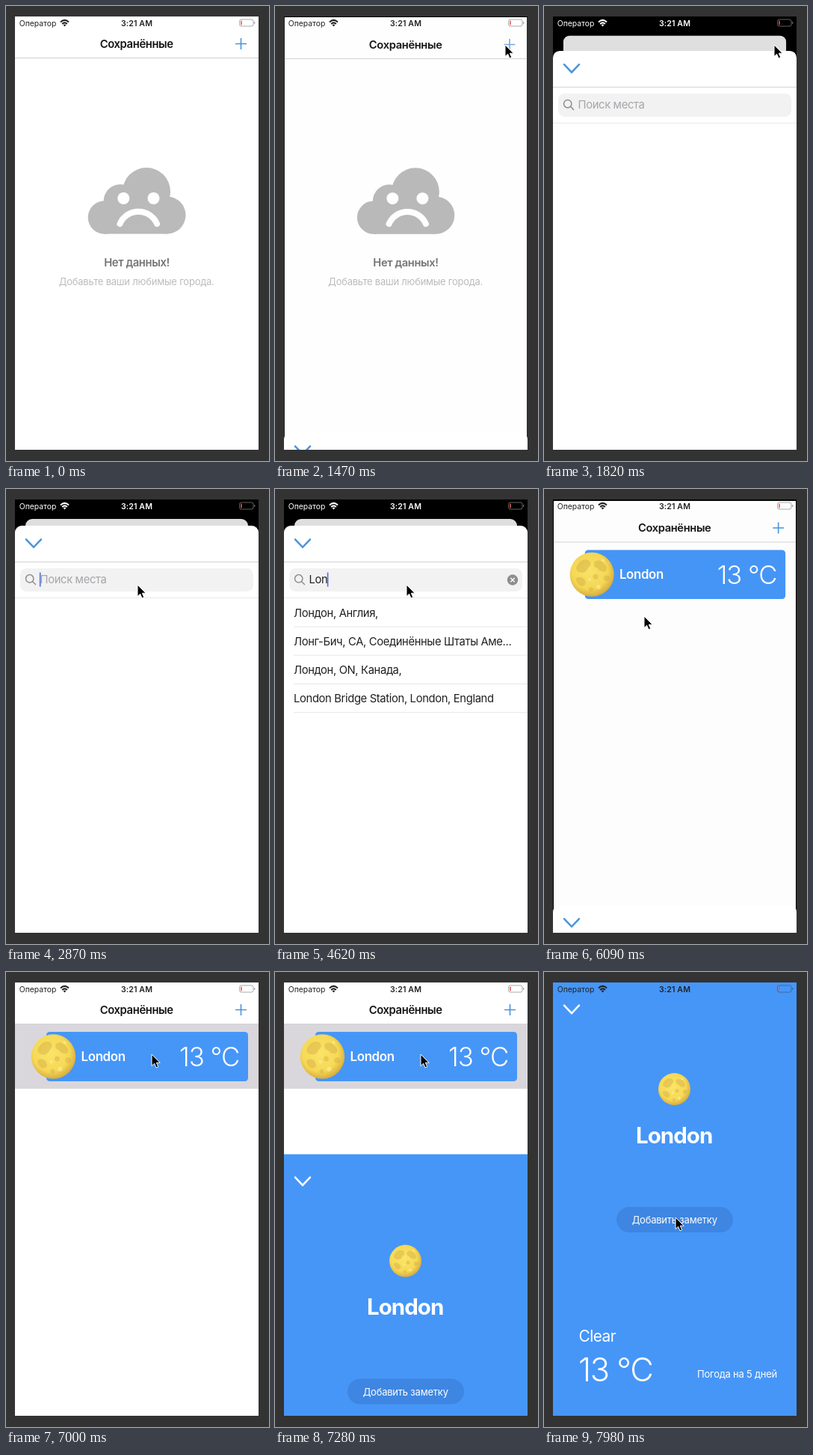
Write an HTML page that moves like this. It is 352 px wide and 608 px high and loops after 8000 ms.

```html
<!DOCTYPE html>
<html lang="ru">
<head>
<meta charset="utf-8">
<title>Погода</title>
<style>
  html, body { margin: 0; width: 100%; height: 100%; overflow: hidden; background: #333; }
  svg { display: block; width: 352px; height: 608px; }
  text { font-family: Inter, "Noto Sans", sans-serif; white-space: pre; }
</style>
</head>
<body>
<svg id="stage" viewBox="0 0 352 608"></svg>
<script>
const LOOP = 8000, STEP = 70;
const BLUE = '#4696f8', TINT = '#4a94dc', INK = '#202022';
const ROW = 38.2;

const text = (x, y, str, size, o = {}) =>
  `<text x="${x}" y="${y}" font-size="${size}" font-weight="${o.weight || 400}" fill="${o.fill || INK}"
    letter-spacing="${o.gap || 0}" text-anchor="${o.anchor || 'start'}">${str}</text>`;
const body = (x, y, str, o) => text(x, y, str, 14.8, { gap: -.36, ...o });
const small = (x, y, str, o) => text(x, y, str, 13, { gap: -.22, ...o });
const line = (x, y, color) => `<path d="M${x} ${y}H338" stroke="${color}"/>`;
const chevron = (y, color) =>
  `<path d="M27 ${y}L37 ${y + 10.5}L47 ${y}" fill="none" stroke="${color}" stroke-width="2.5" stroke-linecap="round"/>`;
const moon = (x, y, r) => `<use href="#moon" transform="translate(${x} ${y}) scale(${r / 30})"/>`;
const row = (str, i) => body(25, 170.5 + ROW * i, str) + line(25, 184 + ROW * i, '#e6e6e8');
const mid = { anchor: 'middle' };

const found = ['Лондон, Англия,', 'Лонг-Бич, CA, Соединённые Штаты Аме...',
  'Лондон, ON, Канада,', 'London Bridge Station, London, England'];
const early = ['Лондон, Англия,', 'Лос-Анджелес, CA, Соединённые Штаты...', 'Лонг-Бич, CA, Соединённые Штаты Аме...',
  'Лос-Кабос, Мексика', 'Лодзь, Польша', 'Лозанна, Швейцария', 'Лондон, ON, Канада,',
  'Лос-Анхелес, Чили', 'Ломе, Того', 'Лома-Линда, CA, Соединённые Штаты...'];

const defs = `<defs>
  <clipPath id="screen"><path d="M12 14H338V593H12Z"/></clipPath>
  <clipPath id="page"><rect id="pageShape" x="12" y="14" width="326" height="579"/></clipPath>
  <radialGradient id="glow" cx=".45" cy=".42" r=".58">
    <stop offset="0" stop-color="#fbe468"/><stop offset=".7" stop-color="#f6d956"/><stop offset="1" stop-color="#d9ae3f"/>
  </radialGradient>
  <g id="moon">
    <circle r="30" fill="url(#glow)"/>
    <g fill="#d2ab45" opacity=".42">
      <path d="M-20-13Q-13-23-4-19Q1-14-5-9Q-8-1-16-3Q-24-5-20-13Z"/>
      <path d="M3-17Q11-22 17-14Q23-9 18-4Q11-3 8-8Q1-10 3-17Z"/>
      <path d="M-22 5Q-15 1-10 7Q-6 14-13 16Q-21 15-22 5Z"/>
      <circle cx="20" cy="5" r="4"/><circle cx="5" cy="3" r="3.5"/><circle cx="-1" cy="20" r="3"/>
    </g>
    <g fill="#fff0a0" opacity=".6"><circle cx="9" cy="17" r="3"/><circle cx="-3" cy="7" r="2"/><circle cx="15" cy="-19" r="2"/></g>
  </g>
</defs>`;

const home = `<g id="home"><g clip-path="url(#page)">
  <path d="M12 14H338V593H12Z" fill="#fff"/>
  ${body(174.7, 55.7, 'Сохранённые', { weight: 600, fill: '#151517', ...mid })}
  <path id="plus" d="M307 50.5H322M314.5 43V58" stroke="${TINT}" stroke-width="1.6"/>
  ${line(12, 69.5, '#d2d2d4')}
  <g id="empty">
    <g fill="#bababa"><circle cx="132" cy="282.5" r="22.3"/><circle cx="153" cy="260.5" r="22.3"/>
      <circle cx="188" cy="248" r="32"/><circle cx="215.5" cy="279.5" r="25"/><path d="M132 262H216V304.6H132Z"/></g>
    <g fill="#fff"><circle cx="157.3" cy="257" r="8"/><circle cx="197.5" cy="257" r="8"/></g>
    <path d="M152.5 291A27 27 0 0 1 202 291" fill="none" stroke="#fff" stroke-width="8" stroke-linecap="round"/>
    ${body(175, 348, 'Нет данных!', { weight: 600, fill: '#757577', ...mid })}
    ${small(174.7, 373.3, 'Добавьте ваши любимые города.', { fill: '#bcbcbe', ...mid })}
  </g>
  <g id="card">
    <path id="cardPress" d="M12 70H338V156H12Z" fill="#d9d7dc"/>
    <rect x="54" y="80" width="270" height="66" rx="4.5" fill="${BLUE}"/>
    ${moon(63.5, 113, 29.7)}
    ${text(100.5, 119, 'London', 16.9, { weight: 600, fill: '#fff', gap: -.35 })}
    ${text(232, 125.5, '13 °C', 34.8, { weight: 300, fill: '#fff', gap: -1 })}
  </g>
  <path id="dim" d="M12 14H338V593H12Z"/>
</g></g>`;

const sheet = `<g id="sheet">
  <rect x="12" y="49" width="326" height="620" rx="9" fill="#fff"/>
  ${chevron(67.3, TINT)}
  ${line(12, 97.5, '#d2d2d4')}
  <rect x="19" y="106" width="312" height="31" rx="8.5" fill="#f2f2f3"/>
  <g fill="none" stroke="#8e8e92" stroke-width="1.5" stroke-linecap="round"><circle cx="31.7" cy="119.8" r="5.2"/><path d="M35.6 123.7L39.5 127.5"/></g>
  <g id="hint">${body(45.5, 126.3, 'Поиск места', { fill: '#a6a6aa' })}</g>
  <g id="query">${body(45.5, 126.3, '')}</g>
  <path id="caret" d="M0 111.5V130.5" stroke="#5674cf" stroke-width="1.7"/>
  <g id="clear"><circle cx="318" cy="121.5" r="7.2" fill="#8d8d91"/>
    <path d="M315.3 118.8L320.7 124.2M320.7 118.8L315.3 124.2" stroke="#fff" stroke-width="1.3"/></g>
  ${line(12, 145.5, '#e9e9eb')}
  <path id="rowPress" d="M12 146H338V184H12Z" fill="#d9d7dc"/>
  <g id="early">${early.map(row).join('')}</g>
  <g id="found">${found.map(row).join('')}</g>
</g>`;

const detail = `<g id="detail">
  <path d="M12 14H338V593H12Z" fill="${BLUE}"/>
  ${chevron(44.7, '#fff')}
  ${moon(174.5, 156.5, 21.5)}
  ${text(174.2, 228.5, 'London', 29.5, { weight: 700, fill: '#fff', gap: -1, ...mid })}
  <rect x="97" y="314" width="156" height="34" rx="17" fill="#3e86e2"/>
  ${small(174.7, 336, 'Добавить заметку', { fill: '#fff', ...mid })}
  ${text(46.5, 494, 'Clear', 20.8, { fill: '#fff', gap: -.5 })}
  ${text(46, 547, '13 °C', 43.4, { weight: 300, fill: '#fff', gap: -1.4 })}
  ${small(205, 541.5, 'Погода на 5 дней', { fill: '#fff' })}
</g>`;

const status = `<g id="status">
  ${text(17.7, 27, 'Оператор', 10.4, { fill: 'currentColor' })}
  ${text(175, 27, '3:21 AM', 10.6, { weight: 600, fill: 'currentColor', gap: .1, ...mid })}
  <g fill="none" stroke="currentColor" stroke-width="2"><path d="M73 21.4Q78.5 16.4 84 21.4M75.2 23.9Q78.5 20.9 81.8 23.9"/></g>
  <path d="M76.6 25.3Q78.5 23.8 80.4 25.3L78.5 27.4Z" fill="currentColor"/>
  <rect x="312.5" y="18" width="18.5" height="9" rx="2.4" fill="none" stroke="currentColor" opacity=".38"/>
  <path d="M332.7 21V24" stroke="currentColor" opacity=".4" stroke-width="1.2"/>
  <path d="M314.9 19.8V25.2" stroke="#e8584f" stroke-width="1.6"/>
</g>`;

const pointer = `<path id="pointer" d="M0 0V15.5L3.6 12.2L6 17.8L8.7 16.6L6.3 11.2H11.2Z" fill="#000" stroke="#fff" stroke-width="1" stroke-linejoin="round"/>`;

document.getElementById('stage').innerHTML = `${defs}
  <path d="M0 0H352V608H0Z" fill="#333"/>
  <g clip-path="url(#screen)"><path d="M12 14H338V593H12Z"/>${home}${sheet}${detail}${status}</g>${pointer}`;

const el = {};
document.querySelectorAll('#stage [id]').forEach(node => el[node.id] = node);
const queryText = el.query.firstElementChild;

const clamp = x => Math.min(1, Math.max(0, x));
const settle = (t, start) => 1 - (1 - clamp((t - start) / 490)) ** 3;
const smooth = x => x * x * (3 - 2 * x);
const linear = x => x;

function track(t, keys, ease = linear) {
  const next = keys.findIndex(k => k[0] > t);
  if (next < 0) return keys.at(-1).slice(1);
  if (next === 0) return keys[0].slice(1);
  const a = keys[next - 1], b = keys[next];
  const k = ease((t - a[0]) / (b[0] - a[0]));
  return a.slice(1).map((v, i) => v + (b[i + 1] - v) * k);
}

const pointerPath = [[280, 229, 458], [910, 308, 52], [1960, 308, 52], [2380, 176, 128], [4690, 176, 128],
  [5180, 134, 170], [6370, 134, 170], [6790, 195, 110], [7700, 195, 110], [7980, 176, 328]];
const plusFade = [[1120, 1], [1190, .3], [1330, .3], [1540, 1]];
const rowFade = [[5250, 0], [5320, 1], [5390, .7], [5460, 0]];
const caretFade = [[2660, 0], [2730, 1], [3430, 1], [3500, .5], [3570, 0], [3780, 0], [3850, 1], [5250, 1], [5320, 0]];
const typing = [[4130, 'Lon', 70.6], [3990, 'Lo', 62.3], [3850, 'L', 53.6], [0, '', 45.7]];

const show = (node, on) => node.style.display = on ? '' : 'none';
const fade = (node, t, keys) => node.setAttribute('opacity', track(t, keys)[0]);
const place = (node, x, y) => node.setAttribute('transform', `translate(${x} ${y})`);

function render(t) {
  const open = settle(t, 1463) - settle(t, 5800);
  const cover = settle(t, 7150);
  const saved = t >= 5600;

  el.home.setAttribute('transform', `translate(175 ${14 + 26 * open}) scale(${1 - .086 * open}) translate(-175 -14)`);
  el.pageShape.setAttribute('rx', 10 * open);
  el.dim.setAttribute('opacity', .13 * open);
  el.plus.setAttribute('stroke', open > .5 ? '#aaa' : TINT);
  fade(el.plus, t, plusFade);
  show(el.empty, !saved);
  show(el.card, saved);
  show(el.cardPress, t >= 6930);

  show(el.sheet, open > 0);
  place(el.sheet, 0, 544 * (1 - open));
  const [, typed, caretX] = typing.find(k => t >= k[0]);
  if (queryText.textContent !== typed) queryText.textContent = typed;
  show(el.hint, !typed);
  show(el.clear, typed);
  place(el.caret, caretX, 0);
  fade(el.caret, t, caretFade);
  fade(el.rowPress, t, rowFade);
  show(el.early, t >= 4410 && t < 4550);
  show(el.found, t >= 4550);

  show(el.detail, cover > 0);
  place(el.detail, 0, 579 * (1 - cover));
  el.status.setAttribute('color', open > .5 ? '#fff' : '#222');

  show(el.pointer, t >= 280);
  place(el.pointer, ...track(t, pointerPath, smooth));
}

function tick() {
  const t = performance.now() % LOOP;
  render(Math.floor(t / STEP) * STEP);
  requestAnimationFrame(tick);
}
tick();
</script>
</body>
</html>
```
